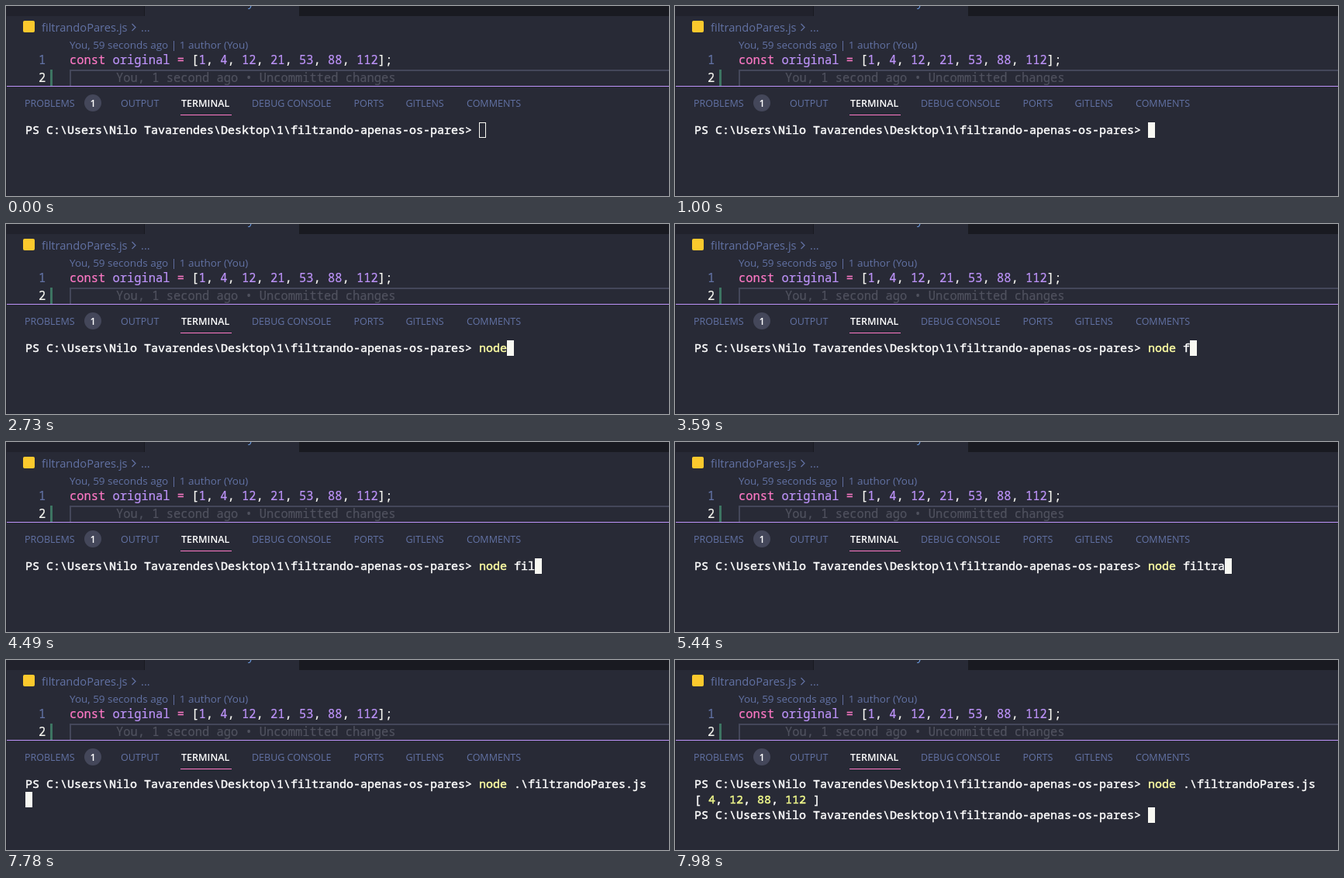
An HTML page that plays this animation: 855 by 245 pixels, repeating every 8 s.

```html
<!DOCTYPE html>
<html lang="pt">
<head>
<meta charset="utf-8">
<title>Terminal</title>
<style>
  html, body { margin: 0; width: 100%; height: 100%; overflow: hidden; background: #282a36; }
  svg { display: block; width: 855px; height: 245px; }
  text { white-space: pre; }
  .ui { font-family: "Open Sans", "Noto Sans", sans-serif; fill: #6272a4; }
  .tabs { font-size: 12.5px; }
  .tabs .active, .tabs.active { font-weight: 600; }
  .code { font: 15.42px "Noto Sans Mono", "DejaVu Sans Mono", monospace; color: #f8f8f2; }
  .term { font: 15px "Noto Sans Mono", "DejaVu Sans Mono", monospace; color: #fff; }
  .code, .term, .code *, .term * { fill: currentColor; stroke: currentColor; }
  .code { stroke-width: 0.2px; }
  .term { stroke-width: 0.45px; }
  .active { fill: #fff; }
  .dim { color: #6272a4; }
  .blame { color: #50525f; }
  .pink { color: #ff79c6; }
  .purple { color: #bd93f9; }
  .command { color: #ffffa5; }
  .number { color: #f1fa8c; }
</style>
</head>
<body>
<svg viewBox="0 0 855 245">
  <rect width="855" height="245" fill="#282a36"/>

  <!-- Editor tabs -->
  <rect width="855" height="13" fill="#191a21"/>
  <rect width="178" height="13" fill="#21222c"/>
  <rect x="179" width="199" height="13" fill="#282a36"/>
  <text class="ui" x="312" y="-0.5" font-size="14.65" style="fill:#6c9be0">y</text>

  <!-- Breadcrumb -->
  <rect x="22" y="19" width="15" height="15" rx="2" fill="#fbc92d"/>
  <g class="ui" font-size="14.65">
    <text x="46" y="32.5">filtrandoPares.js</text>
    <text x="174" y="32.5">...</text>
  </g>
  <path d="M162.5 23l4.5 4.5-4.5 4.5" fill="none" stroke="#6272a4" stroke-width="1.2"/>

  <!-- Code -->
  <text class="ui" x="82" y="55" font-size="13.5">You, 59 seconds ago | 1 author (You)</text>
  <path d="M855 83H83V103" fill="none" stroke="#44475a" stroke-width="2"/>
  <rect x="57" y="82" width="3" height="21" fill="#3d7562"/>
  <g class="code">
    <text class="dim" x="42" y="75">1</text>
    <text x="42" y="98">2</text>
    <text id="source" x="82" y="75"></text>
    <text class="blame" x="142" y="98">You, 1 second ago • Uncommitted changes</text>
  </g>

  <!-- Panel -->
  <rect y="103" width="855" height="142" fill="#282a36"/>
  <rect y="103" width="855" height="1" fill="#bd93f9"/>
  <g id="tabs" class="ui tabs"></g>
  <circle cx="112" cy="125" r="11" fill="#44475a"/>
  <text class="ui tabs active" x="112" y="130" text-anchor="middle">1</text>
  <rect x="225" y="140" width="66" height="1" fill="#ff79c6"/>
  <rect width="1" height="245" fill="#21222c"/>

  <!-- Terminal -->
  <g class="term">
    <text id="line0" x="25" y="165"></text>
    <text id="line1" x="25" y="185"></text>
    <text id="line2" x="25" y="205"></text>
  </g>
  <rect id="cursor" width="8" height="19" stroke="#f8f8f2"/>
</svg>
<script>
const LOOP = 8000, CELL = 9, ROW = 20, LEFT = 25, TOP = 150;
const PROMPT = 'PS C:\\Users\\Nilo Tavarendes\\Desktop\\1\\filtrando-apenas-os-pares> ';
const RESULT = '[ 4, 12, 88, 112 ]';
const FOCUS = 1000, ENTER = 7780, OUTPUT = 7910, READY = 7980;

const $ = id => document.getElementById(id);
const span = (style, text) => `<tspan class="${style}">${text}</tspan>`;
const paintNumbers = (text, style) => text.replace(/\d+/g, n => span(style, n));

// [time, command typed so far]
const typed = [[0, '']];
[2120, 2260, 2530, 2730, 2930, 3520, 3780, 4490, 5040, 5240, 5440].forEach((time, i) =>
  typed.push([time, 'node filtra'.slice(0, i + 1)]));
typed.push([6440, 'node .\\filtrandoPares.js']);

$('source').innerHTML = span('pink', 'const') + span('purple', ' original') + span('pink', ' = ') +
  paintNumbers('[1, 4, 12, 21, 53, 88, 112];', 'purple');

$('tabs').innerHTML = [
  ['PROBLEMS', 24], ['OUTPUT', 148], ['TERMINAL', 226], ['DEBUG CONSOLE', 317],
  ['PORTS', 448.5], ['GITLENS', 515.5], ['COMMENTS', 594]
].map(([label, x]) =>
  `<text x="${x}" y="130"${label === 'TERMINAL' ? ' class="active"' : ''}>${label}</text>`).join('');

function setLine(row, markup) {
  const line = $('line' + row);
  if (line.markup !== markup) line.innerHTML = line.markup = markup;
}

function placeCursor(column, row, filled) {
  const cursor = $('cursor');
  cursor.setAttribute('x', LEFT + column * CELL + 0.5);
  cursor.setAttribute('y', TOP + row * ROW + 0.5);
  cursor.setAttribute('fill', filled ? '#f8f8f2' : 'none');
}

function render(t) {
  const command = typed.filter(([time]) => time <= t).pop()[1];
  setLine(0, PROMPT.replace('>', '&gt;') + span('command', command.slice(0, 4)) + command.slice(4));
  setLine(1, t >= OUTPUT ? paintNumbers(RESULT, 'number') : '');
  setLine(2, t >= READY ? PROMPT.replace('>', '&gt;') : '');

  if (t >= READY) placeCursor(PROMPT.length, 2, true);
  else if (t >= OUTPUT) placeCursor(0, 2, true);
  else if (t >= ENTER) placeCursor(0, 1, true);
  else placeCursor(PROMPT.length + command.length, 0, t >= FOCUS);
}

const start = performance.now();
function tick() {
  render((performance.now() - start) % LOOP);
  requestAnimationFrame(tick);
}
tick();
</script>
</body>
</html>
```
